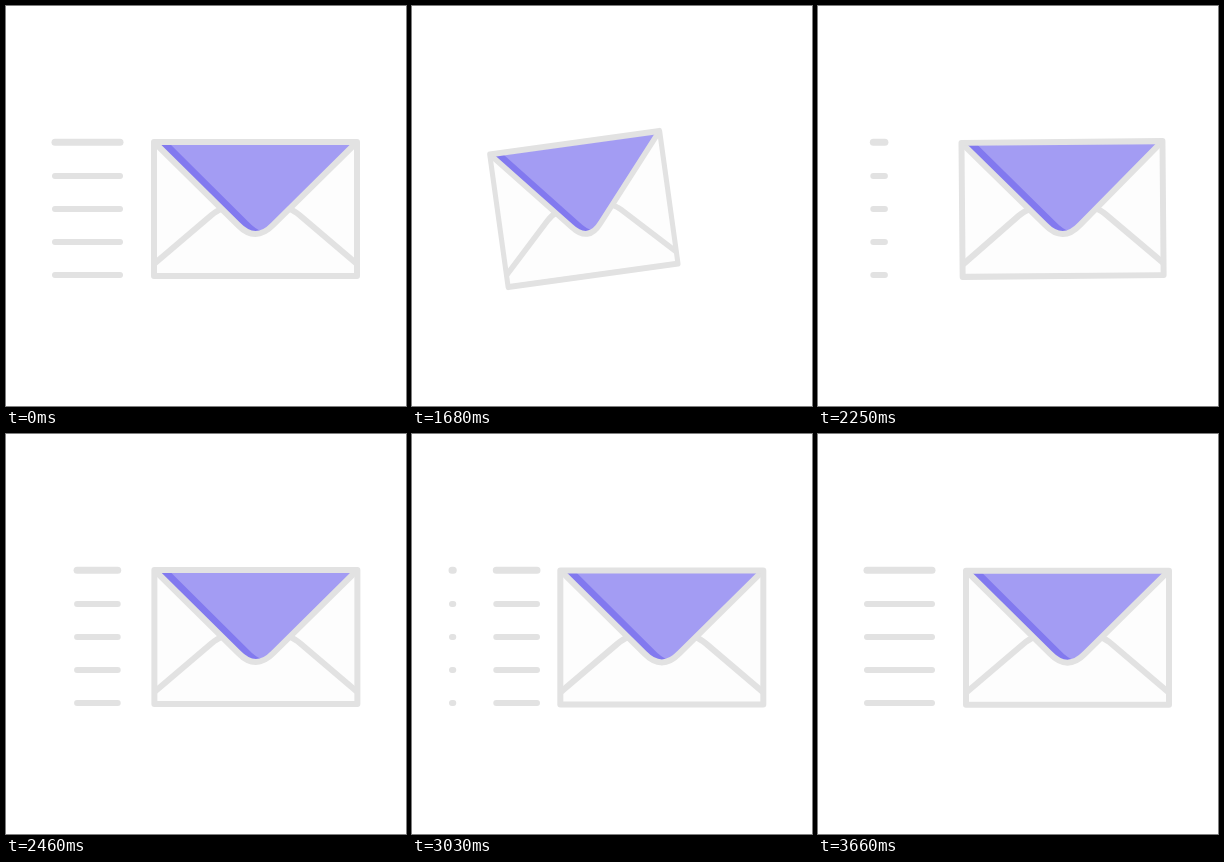
Animation, 400 px wide and 400 px high, one loop 3720 ms. Source, as an HTML page:

```html
<!DOCTYPE html>
<html lang="en">
<head>
<meta charset="utf-8">
<title>Flying envelope</title>
<style>
  html, body { margin: 0; width: 100%; height: 100%; overflow: hidden; background: #fff; }
  svg { display: block; width: 100%; height: 100%; }
  .ink { fill: none; stroke: #e2e2e2; stroke-width: 6; stroke-linejoin: round; }
  #lines { stroke-linecap: round; }
  #lines path:first-child { stroke-width: 7; }
</style>
</head>
<body>
<svg viewBox="0 0 400 400">
  <g id="lines" class="ink"></g>
  <g id="envelope">
    <path fill="#fdfdfd" d="M148 136H351V270H148Z"/>
    <path class="ink" d="M148 258L205 209.500Q211 204.500 216 203M351 258L294 209.500Q288 204.500 283 203"/>
    <path fill="#8279ef" d="M148 136L232 219Q249.500 237 267 219L351 136Z"/>
    <path fill="#a39cf3" d="M162 136L242 215.500Q249 223 257 226L267 219L351 136Z"/>
    <path class="ink" d="M148 136L232 219Q249.500 237 267 219L351 136"/>
    <path class="ink" d="M148 136H351V270H148Z"/>
  </g>
</svg>
<script>
const LOOP = 3720, STEP = 30, JUMP = 1530, RELEASE = 2040, END = 3660;
const LEFT = 40, SPAN = 85, DASH = 65, PERIOD = 108, REST = 49;
const envelope = document.getElementById('envelope');
const lines = document.getElementById('lines');

const rows = [136.3, 170, 203, 236, 269].map(y => {
  const path = document.createElementNS('http://www.w3.org/2000/svg', 'path');
  lines.append(path);
  return { y, path };
});

const ramp = (t, a, b) => Math.min(1, Math.max(0, (t - a) / (b - a)));
const smooth = u => u * u * (3 - 2 * u);

// 0 at rest, 1 when fully pulled back
function pull(t) {
  if (t < JUMP) return 0;
  if (t <= RELEASE) return 1 - 0.55 * Math.exp((JUMP - t) / 100);
  return (1 - ramp(t, RELEASE, RELEASE + 275)) ** 2;
}

function drawEnvelope(t) {
  const s = pull(t), settle = ramp(t, 2700, 3300);
  const x = 249.5 - 88.5 * s + 0.7 * ramp(t, 2300, 2600) * (1 - settle);
  const y = 203 + 0.7 * settle;
  envelope.setAttribute('transform',
    `translate(${x} ${y}) rotate(${-9 * s}) scale(${1 - 0.177 * s} 1) translate(-249.5 -203)`);
}

// Dashes run left, slowing down, behind an end that retracts and grows back
function drawLines(t) {
  const u = ramp(t, RELEASE, END);
  const run = 5 * PERIOD * (1.52 * u - 0.52 * u * u);
  const grown = t <= RELEASE ? 1 - 1.07 * pull(t) : smooth(ramp(t, RELEASE, 2600));
  const end = LEFT + SPAN * grown;
  const first = REST - run % PERIOD;
  const dashes = [];
  for (let x = first - PERIOD; x < end; x += PERIOD) {
    const a = Math.max(LEFT, x), b = Math.min(end, x + DASH);
    if (b > a) dashes.push([a, b]);
  }
  for (const { y, path } of rows)
    path.setAttribute('d', dashes.map(([a, b]) => `M${a} ${y}H${b}`).join(''));
}

function frame() {
  const t = Math.floor(performance.now() % LOOP / STEP) * STEP;
  drawEnvelope(t);
  drawLines(t);
  requestAnimationFrame(frame);
}
frame();
</script>
</body>
</html>
```
